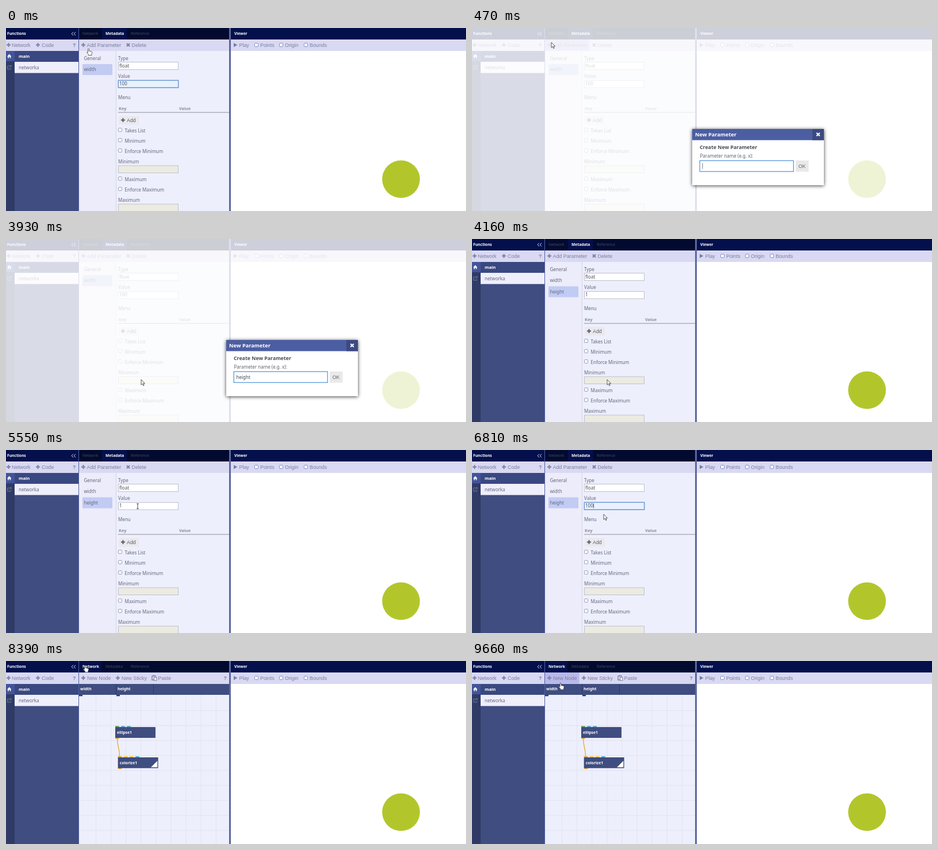
Animation of 800x319 px, one loop 9750 ms. Source, as an HTML page:

```html
<!DOCTYPE html>
<html lang="en">
<head>
<meta charset="utf-8">
<title>New parameter</title>
<style>
html, body { margin: 0; width: 100%; height: 100%; overflow: hidden; background: #fff; }
svg { display: block; width: 100vw; height: 100vh; }
text { font-family: "Noto Sans", "Open Sans", sans-serif; white-space: pre; }
.ui { font-family: "Liberation Sans", Arial, sans-serif; }
.b { font-weight: 600; }
</style>
</head>
<body>
<svg id="stage" viewBox="0 0 800 319" preserveAspectRatio="none"></svg>
<script>
const LOOP = 9750;
const NAVY = '#03104c', BLUE = '#3f4d80', INK = '#62667c', TOOL = '#7b7f9f';

const rect = (x, y, w, h, fill, extra = '') =>
  `<rect x="${x}" y="${y}" width="${w}" height="${h}" fill="${fill}" ${extra}/>`;
const path = (d, stroke, w = 1, fill = 'none') =>
  `<path d="${d}" stroke="${stroke}" stroke-width="${w}" fill="${fill}"/>`;
// y is the middle of the capitals
const text = (x, y, s, size = 8, fill = INK, cls = '', extra = '') =>
  `<text x="${x}" y="${y + size * 0.36}" font-size="${size}" fill="${fill}" class="${cls}" ${extra}>${s}</text>`;
const group = (id, body) => `<g id="${id}">${body}</g>`;
const plus = (x, y, c = TOOL) => path(`M${x} ${y}h7m-3.5 -3.5v7`, c, 2);
const cross = (x, y, c, r = 2.6) =>
  path(`M${x - r} ${y - r}l${2 * r} ${2 * r}m0 ${-2 * r}l${-2 * r} ${2 * r}`, c, 2.1);
const tool = (x, s) => text(x, 29.7, s, 8.9, TOOL, 'ui');
const box = (x, y, c = '#8d92a8') =>
  rect(x + .5, y + .5, 6, 6, '#fff', `rx="1" stroke="${c}" stroke-width=".9"`);
const field = (y, fill, h = 13) =>
  rect(195.5, y + .5, 104, h, fill, 'stroke="#bfc1cd"');

function sidebar() {
  return rect(0, 0, 127, 20, NAVY) + text(2, 10, 'Functions', 6.7, '#fff', 'b') +
    path('M117 7l-3 3l3 3M121 7l-3 3l3 3', '#c9cdec', 1) +
    rect(0, 20, 127, 20, '#d9d9f3') + plus(1, 29.5) + tool(10, 'Network') +
    plus(52, 29.5) + tool(62, 'Code') + text(116, 29.7, '?', 8.9, TOOL, 'ui', 'font-weight="700"') +
    rect(0, 40, 126, 279, BLUE) + rect(0, 40, 15, 279, '#2f3b66') +
    rect(0, 40, 15, 18, '#42549a') + rect(15, 40, 111, 18, '#394880') +
    path('M2 49.5L5.7 45.5L9.4 49.5H8.3V52.5H6.6V50H4.8V52.5H3.1V49.5Z', 'none', 0, '#fff') +
    text(22, 49, 'main', 7.6, '#fff', 'b') +
    rect(15, 59, 111, 19.5, '#efeffc') + text(22, 68.8, 'networka') +
    path('M6 66H2.7V72H8.3V69.5M5 69.5L9 65.5M6.5 65.5H9V68', '#75809f', .9) +
    rect(126, 0, 1, 319, '#5360a0');
}

function viewer() {
  const checks = [[432, 'Points'], [475, 'Origin'], [518, 'Bounds']];
  return rect(391, 0, 409, 20, NAVY) + text(397, 10, 'Viewer', 6.6, '#fff', 'b') +
    rect(391, 20, 409, 20, '#d9d9f3') +
    path('M396 26L402.5 29.6L396 33.2Z', 'none', 0, TOOL) + tool(405.5, 'Play') +
    checks.map(([x, s]) => box(x, 26, '#6c82b4') + tool(x + 10, s)).join('') +
    rect(391, 40, 409, 279, '#fff') +
    '<circle cx="687" cy="263.5" r="32.8" fill="#b2c62c"/>' +
    rect(388, 0, 3, 319, '#5c689c');
}

function tabs() {
  return rect(127, 0, 261, 20, '#020a30') + rect(127, 0, 261, 20, NAVY, 'id="tabBg"') +
    text(133, 10, 'Network', 6.8, '#fff', '', 'id="tab0"') +
    text(173, 10, 'Metadata', 6.7, '#fff', '', 'id="tab1"') +
    text(217, 10, 'Reference', 6.8, '#454a5c') +
    rect(127, 20, 261, 20, '#d9d9f3') + rect(127, 20, 77, 19.5, '#b9b8ea', 'id="hover"');
}

function metadata() {
  const checks = [[178, 'Takes List'], [196, 'Minimum'], [214, 'Enforce Minimum'],
    [263, 'Maximum'], [281, 'Enforce Maximum']];
  const labels = [[53, 'Type'], [84.5, 'Value'], [121, 'Menu'], [233.3, 'Minimum'], [300.3, 'Maximum']];
  return plus(131, 29.5) + tool(140.5, 'Add Parameter') + cross(212.5, 29.5, TOOL) + tool(218.5, 'Delete') +
    rect(127, 40, 261, 279, '#eeeffc') + rect(127, 40, 64, 279, '#ececfa') + rect(191, 40, 1, 279, '#d3d5e6') +
    rect(133, 63, 52, 19, '#c1cbf3', 'id="picked" rx="1"') +
    text(135.5, 53, 'General') + text(135.5, 72.5, 'width') + text(135.5, 92, 'height', 8, INK, '', 'id="item"') +
    labels.map(([y, s]) => text(195, y, s)).join('') +
    field(59, '#fff') + text(197, 66, 'float', 8, '#4c4f5c') +
    field(91, '#fff', 12.5) +
    rect(195.3, 91.3, 104.4, 12.6, '#e8f1fd', 'id="focus" stroke="#6c9bd6" stroke-width="1.5"') +
    text(197, 97.3, '100', 8, '#4c4f5c', '', 'id="value"') +
    rect(0, 93.3, .8, 8, '#333', 'id="valueCaret"') +
    text(196, 140.5, 'Key', 7.5, '#8b8e9c', 'b') + text(301, 140.5, 'Value', 7.3, '#8b8e9c', 'b') +
    rect(195, 146.6, 193, 1, '#8d90a0') +
    rect(196, 153, 35, 15.5, '#eae9ed') + plus(200, 160.5, '#565968') + text(210, 160.7, 'Add', 8.9, '#5d6070', 'ui') +
    checks.map(([y, s]) => box(195, y - 4) + text(206.5, y + 1, s)).join('') +
    field(239.5, '#ebebe2', 12.5) + field(306.5, '#ebebe2', 13) +
    group('list', rect(195, 105, 125.5, 33, '#fff', 'stroke="#c8c9d2" stroke-width=".7"') +
      rect(195.5, 110, 124.5, 22, '#e9e9ee', 'id="row"') + text(201, 121, '100', 8, '#333'));
}

function network() {
  let s = plus(131, 29.5) + tool(141, 'New Node') + plus(191, 29.5) + tool(201, 'New Sticky') +
    path('M254 26H260V27.5M254 26V33H257M256 25.5H258', TOOL, 1.4) +
    rect(257.5, 28.5, 4.5, 5.5, '#f0f0fb', `stroke="${TOOL}"`) + tool(264.5, 'Paste') +
    text(378.5, 29.7, '?', 8.9, TOOL, 'ui', 'font-weight="700"') +
    rect(127, 40, 261, 279, '#eeeffc');
  for (let x = 156; x < 388; x += 26.1) s += rect(x, 59, 1, 260, '#e2e3f3');
  for (let y = 86; y < 319; y += 26.1) s += rect(127, y, 261, 1, '#e2e3f3');
  s += rect(127, 40, 261, 19, BLUE) + rect(191, 40, 1, 19, '#2f3c6b') + rect(256, 40, 1, 19, '#2f3c6b') +
    text(129, 49, 'width', 6.9, '#fff', 'b') + text(194, 49, 'height', 6.9, '#fff', 'b') +
    rect(127, 59, 6, 2.3, '#2f3c6b') + rect(192, 59, 6, 2.3, '#2f3c6b');
  s += path('M193.5 135C193.5 149 197.5 152 197.5 166', '#e0a83c', 1.3);
  const node = (x, y, label, ports) =>
    ports.map((c, i) => rect(x + i * 10.1, y - 2, 6.7, 2.2, c)).join('') +
    rect(x, y + 18, 6.7, 2.3, '#dca63a') +
    rect(x + .4, y + .4, 69, 17.8, BLUE, 'stroke="#2f3c6b" stroke-width=".8"') +
    text(x + 3, y + 9.5, label, 6.8, '#fff', 'b');
  s += node(190, 115.3, 'ellipse1', ['#5fa55a', '#5aa7d2', '#5aa7d2']) +
    node(194.7, 168, 'colorize1', ['#dca63a', '#ecc646', '#ecc646', '#5aa7d2']) +
    path('M252 185.3L263.3 174V185.3Z', 'none', 0, '#fff');
  return s;
}

function dialog() {
  return rect(0, 0, 800, 319, '#fff', 'opacity=".8"') +
    rect(383, 176, 229, 98, '#fff', 'style="filter:drop-shadow(0 1px 3px rgba(0,0,0,.75))"') +
    rect(383, 176, 229, 19.5, '#4c5ea2') + rect(592, 176, 20, 19.5, '#3c4a82') + cross(602, 185.5, '#fff', 2.8) +
    text(388, 185.3, 'New Parameter', 9.2, '#fff', 'b') +
    text(396, 208, 'Create New Parameter', 8.8, '#4b4e58', 'b') +
    text(396.5, 222.8, 'Parameter name (e.g. x):', 8, '#5f626c') +
    rect(396.2, 231.2, 163, 19, '#fff', 'stroke="#579bdc" stroke-width="1.3"') +
    text(400.5, 240.7, '', 8, '#444750', '', 'id="typed"') +
    rect(0, 235.5, .8, 10, '#555', 'id="caret"') +
    rect(563, 231, 22.5, 19.5, '#e9e9ea') + text(567.7, 240.8, 'OK', 8.8, '#666974', 'ui');
}

const cursors =
  group('arrow', path('M0 0V9.3L2.2 7.3L3.7 10.7L5.2 10L3.7 6.8H6.5Z', '#333', .8, '#fff')) +
  group('hand', path('M-1 1Q0 -.8 1 1V4.6L5.2 5.4Q6.3 5.8 6.2 7L5.4 10.2V12H-.2V10.4L-3.2 7Q-3 5.6 -1 7Z', '#3a3a44', .8, '#fff')) +
  group('beam', path('M-1.8 -4.3H1.8M0 -4.3V4.3M-1.8 4.3H1.8', '#333', .9));

document.getElementById('stage').innerHTML =
  sidebar() + viewer() + tabs() + group('meta', metadata()) + group('net', network()) +
  group('dialog', dialog()) + group('cursor', cursors);

const el = {};
document.querySelectorAll('[id]').forEach(n => el[n.id] = n);
const show = (n, on) => n.setAttribute('visibility', on ? 'inherit' : 'hidden');
const set = (n, attrs) => { for (const k in attrs) n.setAttribute(k, attrs[k]); };
const within = (t, ...spans) => spans.some(([a, b]) => t >= a && t < b);
const ease = p => (1 - Math.cos(Math.PI * p)) / 2;

// Pointer moves: first step, last step, step count, destination
const moves = [
  [70, 160, 2, 138, 25],
  [940, 1490, 8, 235, 245],
  [4860, 5550, 10, 229, 98],
  [6170, 6500, 5, 229, 112],
  [7270, 7990, 10, 137.5, 7.5],
  [9350, 9660, 5, 154, 38],
];
function pointer(t) {
  let x = 143.5, y = 35.5;
  for (const [from, to, n, tx, ty] of moves) {
    if (t < from) break;
    const step = Math.floor((t - from) / (to - from) * (n - 1) + 1.001);
    const p = ease(Math.min(1, step / n));
    x += (tx - x) * p;
    y += (ty - y) * p;
  }
  return [x, y];
}

const keys = [1960, 2140, 2290, 3150, 3310, 3460];

function draw(t) {
  const [x, y] = pointer(t);
  const modal = within(t, [390, 4160]), net = t >= 8230, added = t >= 4160;
  const hand = t < 470 || (t >= 7270 && y < 40), beam = t >= 4860 && t < 6400 && y > 90 && y < 104;
  set(el.cursor, { transform: `translate(${x} ${y})` });
  show(el.hand, hand);
  show(el.beam, beam);
  show(el.arrow, !hand && !beam);

  show(el.meta, !net);
  show(el.net, net);
  set(el.tabBg, net ? { x: 127, width: 39 } : { x: 167, width: 43 });
  const hot = t >= 7270 && y < 20;
  set(el.tab0, { fill: net ? '#fff' : hot ? '#9a9fb5' : '#454a5c', 'font-weight': net ? 600 : 400, 'font-size': net ? 6.6 : 6.8 });
  set(el.tab1, { fill: net ? '#454a5c' : '#fff', 'font-weight': net ? 400 : 600 });
  show(el.hover, t >= 70 && y >= 20 && y < 39 && x < 204);
  set(el.hover, { width: net ? 59.5 : 77 });

  if (!net) {
    const focus = t < 390 || t >= 5640;
    set(el.picked, { y: added ? 82.5 : 63 });
    show(el.item, added);
    show(el.focus, focus);
    el.value.textContent = added && t < 6500 ? '1' : '100';
    show(el.list, within(t, [5720, 6740]));
    show(el.row, t >= 6330 && t < 6740);
    show(el.valueCaret, within(t, [5640, 6170], [6740, 7270], [7800, 8230]));
    set(el.valueCaret, { x: t < 6500 ? 201.8 : 211 });
  }

  show(el.dialog, modal);
  if (modal) {
    el.typed.textContent = 'height'.slice(0, keys.filter(k => t >= k).length);
    set(el.caret, { x: 400.5 + el.typed.getComputedTextLength() });
    show(el.caret, within(t, [470, 1000], [1490, 2840], [3150, 3930]));
  }
}

const start = performance.now();
function tick() {
  draw((performance.now() - start) % LOOP);
  requestAnimationFrame(tick);
}
tick();
</script>
</body>
</html>
```
